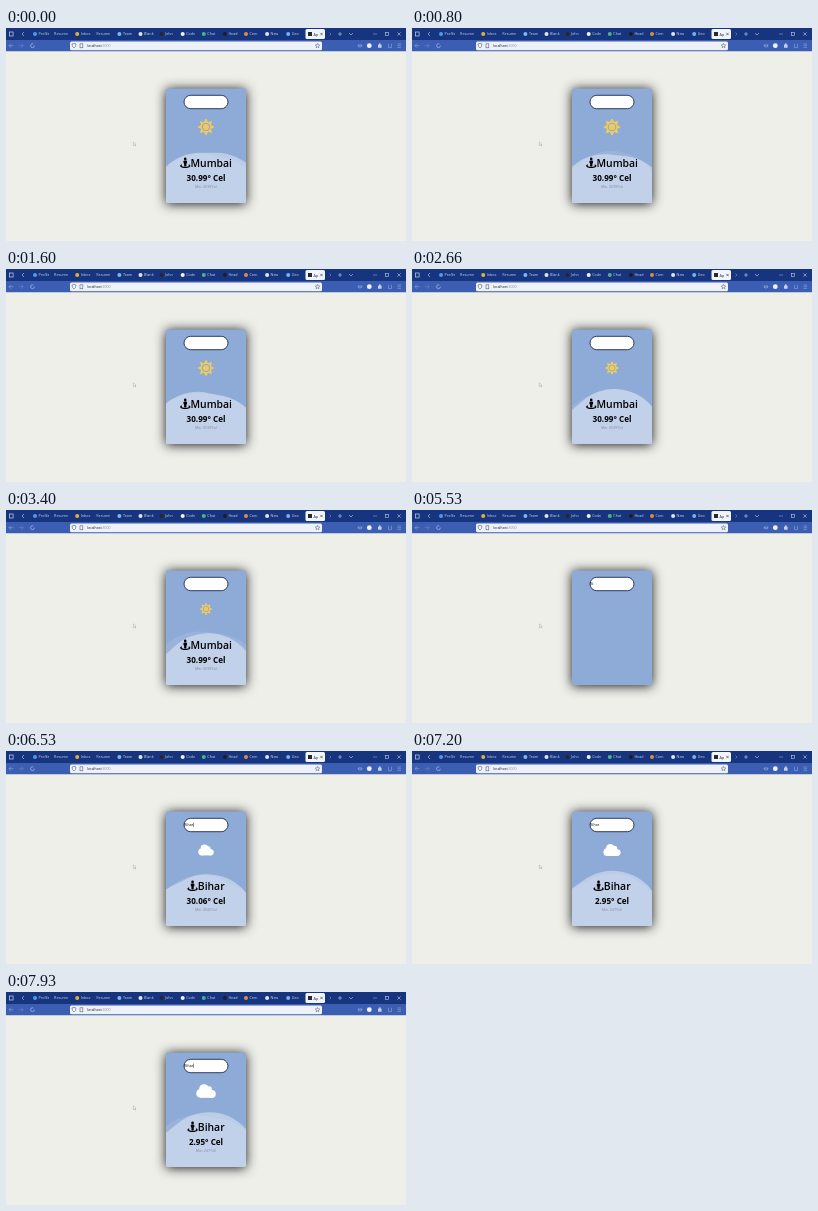
An HTML page with a canvas that plays this animation: 400x213 px, repeating every 8 s.

```html
<!DOCTYPE html>
<html lang="en">
<head>
<meta charset="utf-8">
<title>Weather card</title>
<style>
html, body { margin: 0; width: 100%; height: 100%; overflow: hidden; background: #efefea; }
canvas { display: block; width: 400px; height: 213px; }
</style>
</head>
<body>
<canvas id="stage"></canvas>
<script>
const W = 400, H = 213, LOOP = 8000, TAU = Math.PI * 2;
const SANS = '"Open Sans", "Noto Sans", sans-serif';
const PALE = '#c3cfee';
const canvas = document.getElementById('stage');
const ctx = canvas.getContext('2d');
const dpr = window.devicePixelRatio || 1;
canvas.width = W * dpr;
canvas.height = H * dpr;

const card = { x: 160, y: 60.5, w: 80, h: 114.6 };
const HIDE = 4730, SHOW = 6000, REFRESH = 6900;
const keys = [[4400, 'B'], [5200, 'Bi'], [5730, 'Bih'], [5800, 'Biha'], [6470, 'Bihar']];
const caretOn = [[3900, 5000], [5200, 5530], [5730, 6300], [6470, 7000], [7500, 8000]];
const tabs = [
  ['Profile', '#4d9bea'], ['Resume', ''], ['Inbox', '#e3b23c'], ['Resume', ''],
  ['Team', '#7db5f5'], ['Blank', '#dfe6f7'], ['John', '#2a2528'], ['Code', '#f3f5fb'],
  ['Chat', '#4db38a'], ['Head', '#1d1d24'], ['Com', '#e58a3a'], ['New', '#dfe6f7'], ['Geo', '#79aef2']
];

function rect(x, y, w, h, fill, r = 0) {
  ctx.beginPath();
  ctx.roundRect(x, y, w, h, r);
  ctx.fillStyle = fill;
  ctx.fill();
}

function disc(x, y, r, fill) {
  ctx.beginPath();
  ctx.arc(x, y, r, 0, TAU);
  ctx.fillStyle = fill;
  ctx.fill();
}

function line(points, color = PALE, width = 0.6) {
  ctx.beginPath();
  points.forEach(([x, y]) => ctx.lineTo(x, y));
  ctx.strokeStyle = color;
  ctx.lineWidth = width;
  ctx.stroke();
}

function text(str, x, y, size, fill, weight = 400, align = 'left') {
  ctx.font = `${weight} ${size}px ${SANS}`;
  ctx.textAlign = align;
  ctx.fillStyle = fill;
  ctx.fillText(str, x, y);
}

function cross(x, y, r, color) {
  line([[x - r, y - r], [x + r, y + r]], color);
  line([[x - r, y + r], [x + r, y - r]], color);
}

// Runs draw in a local space centred on (x, y).
function at(x, y, scale, angle, draw) {
  ctx.save();
  ctx.translate(x, y);
  ctx.rotate(angle);
  ctx.scale(scale, scale);
  draw();
  ctx.restore();
}

function drawTabs() {
  rect(0, 0, W, 12, '#17357f');
  ctx.strokeStyle = PALE;
  ctx.lineWidth = 0.7;
  ctx.strokeRect(3.5, 4, 3.6, 4);
  line([[18, 4], [16, 6], [18, 8]]);
  tabs.forEach(([label, color], i) => {
    const x = 27 + i * 21.1;
    if (color) disc(x + 2, 6, 2, color);
    ctx.save();
    ctx.beginPath();
    ctx.rect(x, 0, 16, 12);
    ctx.clip();
    text(label, x + (color ? 5.5 : 0), 7.4, 3.7, '#c9d3ee');
    ctx.restore();
  });
  rect(299.5, 1, 19.5, 10, '#f3f5fc', 1.5);
  rect(302, 4, 4, 4, '#252a35');
  text('Ap', 307.5, 7.5, 3.8, '#252a40');
  cross(315.5, 6, 1.2, '#252a40');
  line([[323.5, 4.5], [325, 6], [323.5, 7.5]], '#7f93cc');
  line([[332, 6], [336, 6]]);
  line([[334, 4], [334, 8]]);
  line([[343, 5], [345, 7], [347, 5]]);
  line([[367, 6], [371, 6]], '#93a4d4');
  ctx.strokeStyle = PALE;
  ctx.strokeRect(379.5, 4.5, 3, 3);
  cross(393, 6, 1.6, PALE);
}

function drawToolbar() {
  rect(0, 12, W, 11.3, '#3b5db2');
  line([[7.5, 17.7], [3, 17.7]], '#90a6dc');
  line([[5, 15.7], [3, 17.7], [5, 19.7]], '#90a6dc');
  line([[13, 17.7], [17, 17.7]], '#6f89c9');
  line([[15.3, 15.7], [17.3, 17.7], [15.3, 19.7]], '#6f89c9');
  ctx.beginPath();
  ctx.arc(26.5, 17.7, 1.9, 0, 5.2);
  ctx.strokeStyle = PALE;
  ctx.stroke();
  rect(64, 13.5, 252, 8.8, '#eff1f8', 1.5);
  line([[66, 16], [68, 15.3], [70, 16], [69.5, 18.5], [68, 20], [66.5, 18.5], [66, 16]], '#59617a');
  ctx.strokeRect(74, 15.8, 2.8, 4);
  text('localhost', 81, 19.2, 3.5, '#171b2b');
  const hostWidth = ctx.measureText('localhost').width;
  text(':3000', 81 + hostWidth, 19.2, 3.5, '#8a90a3');
  const star = [];
  for (let i = 0; i <= 10; i++) {
    const a = i * Math.PI / 5, r = i % 2 ? 1.1 : 2.4;
    star.push([311.5 + r * Math.sin(a), 17.8 - r * Math.cos(a)]);
  }
  line(star, '#4c5570', 0.5);
  ctx.beginPath();
  ctx.arc(354, 17, 2, 0, Math.PI);
  ctx.closePath();
  ctx.strokeStyle = PALE;
  ctx.stroke();
  disc(363.3, 17.7, 2.4, '#f0f3ff');
  rect(372, 16.5, 3.6, 3.3, PALE, 0.6);
  disc(373.8, 16.2, 0.9, PALE);
  line([[382.5, 15.8], [382.5, 19.6], [385.5, 19.6], [385.5, 15.8]], '#90a6dc');
  for (let y = 16; y < 20.5; y += 1.7) line([[391.5, y], [395, y]], '#90a6dc');
}

function drawPointer() {
  ctx.beginPath();
  [[127.4, 113.9], [127.4, 117.6], [128.3, 116.8], [129, 118.1], [129.6, 117.7], [129, 116.5], [130.1, 116.4]]
    .forEach(([x, y]) => ctx.lineTo(x, y));
  ctx.closePath();
  ctx.fillStyle = '#fff';
  ctx.fill();
  ctx.strokeStyle = '#8b8b8b';
  ctx.lineWidth = 0.4;
  ctx.stroke();
}

function drawCard() {
  ctx.save();
  ctx.shadowColor = 'rgba(0,0,0,.9)';
  ctx.shadowBlur = 12 * dpr;
  ctx.shadowOffsetY = 0.8 * dpr;
  rect(card.x, card.y, card.w, card.h, '#8eaad7', 1.5);
  ctx.restore();
}

function drawWave(age, period, alpha) {
  const side = 114.3;
  at(200, 182, 1, TAU * age / period, () =>
    rect(-side / 2, -side * 0.48, side, side, `rgba(255,255,255,${alpha})`, side * 0.43));
}

// Icons use a 512-unit em square.
function sun() {
  ctx.beginPath();
  for (let i = 0; i < 8; i++) {
    const a = i * TAU / 8;
    for (const [turn, r] of [[-0.07, 250], [0.07, 250], [TAU / 16, 164]])
      ctx.lineTo(r * Math.cos(a + turn), r * Math.sin(a + turn));
  }
  ctx.closePath();
  ctx.moveTo(128, 0);
  ctx.arc(0, 0, 128, 0, TAU);
  ctx.fillStyle = '#f0cb5c';
  ctx.fill('evenodd');
  disc(0, 0, 96, '#f0cb5c');
}

function cloud() {
  [[-176, 80, 144], [-64, -64, 160], [96, -64, 96], [192, 96, 128]]
    .forEach(([x, y, r]) => disc(x, y, r, '#fff'));
  rect(-176, -20, 368, 244, '#fff');
}

function person() {
  disc(0, -192, 64, '#000');
  rect(-88, -116, 176, 148, '#000', 46);
  rect(-56, -40, 112, 216, '#000', 34);
  ctx.beginPath();
  ctx.ellipse(0, 150, 225, 74, 0, -0.75, Math.PI + 0.75);
  ctx.strokeStyle = '#000';
  ctx.lineWidth = 58;
  ctx.stroke();
}

function pulse(age) {
  const p = age % 6000 / 3000;
  return (1 - Math.cos(Math.PI * p)) / 2;
}

function drawWeather(t, typed) {
  const fresh = t >= SHOW;
  const age = t - (fresh ? SHOW : -14250);
  ctx.save();
  ctx.beginPath();
  ctx.roundRect(card.x, card.y, card.w, card.h, 1.5);
  ctx.clip();
  drawWave(age, 3000, 0.4);
  drawWave(age, 7000, 0.1);
  ctx.restore();

  at(200, 99, (12 + 5 * pulse(age)) / 512, 0, fresh ? cloud : sun);

  const place = typed || 'Mumbai', size = 10.4;
  ctx.font = `600 ${size}px ${SANS}`;
  const left = 200 - (size + ctx.measureText(place).width) / 2;
  at(left + size / 2, 134.8, size / 512, 0, person);
  text(place, left + size, 139, size, '#000', 600);

  const [temp, low] = !fresh ? ['30.99', '30.99'] : t < REFRESH ? ['30.06', '30.06'] : ['2.95', '2.67'];
  text(`${temp}° Cel`, 200, 153.2, 8.1, '#000', 700, 'center');
  text(`Min : ${low}°Cel`, 200, 159.6, 3.1, '#78828f', 400, 'center');
}

function drawInput(t, typed) {
  rect(178, 67.3, 44, 13.4, '#fff', 6.7);
  ctx.strokeStyle = '#1c2c50';
  ctx.lineWidth = 0.9;
  ctx.stroke();
  text(typed, 178.2, 75.2, 3.6, '#000');
  const end = 178.2 + ctx.measureText(typed).width;
  if (caretOn.some(([from, to]) => t >= from && t < to)) rect(end, 71.4, 0.45, 4.6, '#111');
}

function render(t) {
  ctx.setTransform(dpr, 0, 0, dpr, 0, 0);
  rect(0, 0, W, H, '#efefea');
  drawTabs();
  drawToolbar();
  drawPointer();
  drawCard();
  const typed = keys.reduce((value, [time, next]) => t >= time ? next : value, '');
  if (t < HIDE || t >= SHOW) drawWeather(t, typed);
  drawInput(t, typed);
}

const start = performance.now();
function tick() {
  render((performance.now() - start) % LOOP);
  requestAnimationFrame(tick);
}
tick();
</script>
</body>
</html>
```
